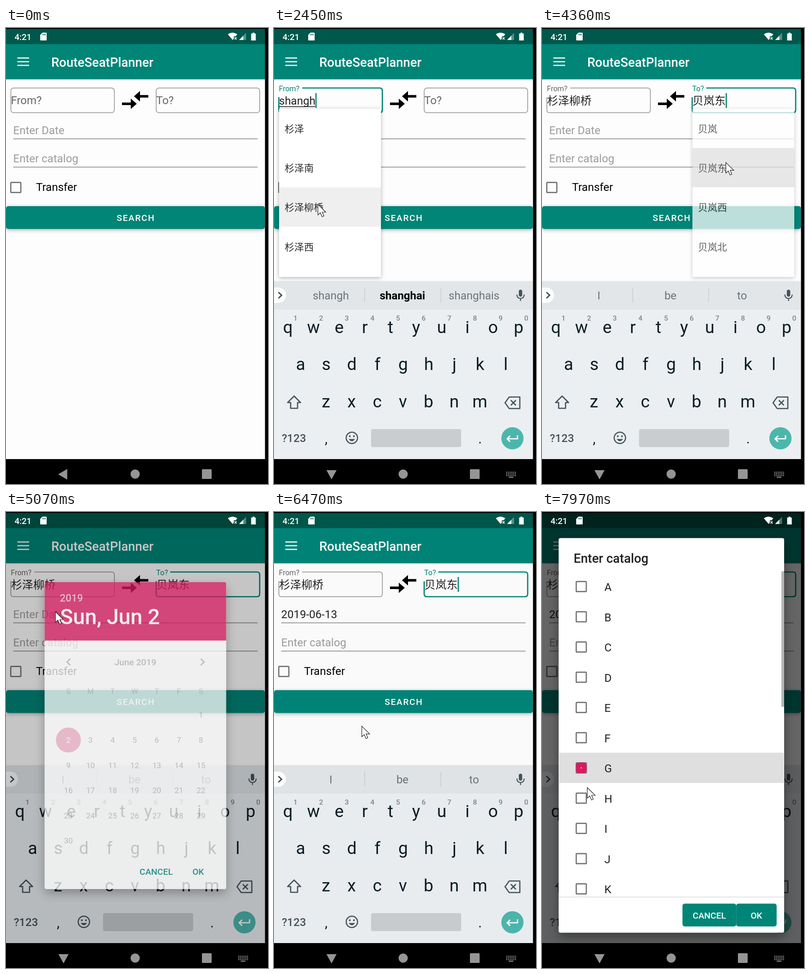
An HTML page that plays this animation: 567 by 988 pixels, repeating every 7990 ms.

```html
<!DOCTYPE html>
<html lang="en">
<head>
<meta charset="utf-8">
<title>Booking form</title>
<style>
html, body { margin: 0; width: 100%; height: 100%; overflow: hidden; background: #000; }
svg { display: block; width: 567px; height: 988px; }
text { font-family: Roboto, "Noto Sans CJK SC", "Noto Sans CJK", sans-serif; white-space: pre; }
.med { font-weight: 500; }
.mid { text-anchor: middle; }
.lift { filter: drop-shadow(0 2px 4px rgba(0,0,0,.3)); }
.modal { filter: drop-shadow(0 9px 11px rgba(0,0,0,.38)); }
</style>
</head>
<body>
<svg id="stage" viewBox="0 0 567 988"></svg>
<script>
const LOOP = 7990, TEAL = '#008577', PINK = '#d81b60', INK = '#212121';
const stage = document.getElementById('stage');
const $ = id => document.getElementById(id);

// ---------- markup helpers ----------
const text = (x, y, size, fill, str, extra = '') =>
  `<text x="${x}" y="${y}" font-size="${size}" fill="${fill}" ${extra}>${str}</text>`;
const rect = (x, y, w, h, fill, extra = '') =>
  `<rect x="${x}" y="${y}" width="${w}" height="${h}" fill="${fill}" ${extra}/>`;
const path = (d, extra) => `<path d="${d}" ${extra}/>`;
const stroke = (color, w) => `fill="none" stroke="${color}" stroke-width="${w}"`;
const box = (cx, cy, extra = '') =>
  `<rect x="${cx - 10.9}" y="${cy - 10.9}" width="21.8" height="21.8" rx="1.5" ${stroke('#757575', 2.7)} ${extra}/>`;

function statusIcons() {
  return text(18.5, 26, 18.6, '#fff', '4:21', 'class="med"') +
    path('M79 10H86.5Q88 10 88 11.5V25.5Q88 27 86.5 27H75.5Q74 27 74 25.5V15Z', 'fill="#fff"') +
    path('M79.5 12.5V16M82.3 12.5V16M85 12.5V16', stroke('#00574b', 1.3)) +
    path('M480 13.5Q490 6.5 500.5 13.5L497 18H493V23L490.5 26Z', 'fill="#fff"') +
    path('M494.5 20L499 25M499 20L494.5 25', stroke('#fff', 1.6)) +
    path('M504.5 26L519.5 10.5V26Z', 'fill="#fff" opacity=".35"') +
    path('M504.5 26L513.5 16.7V26Z', 'fill="#fff"') +
    path('M530.5 12H533.5V10H537.5V12H540.5V27H530.5Z', 'fill="#fff"');
}

function field(id, x, label) {
  return `<g id="${id}">
    <rect class="whole" x="${x}" y="130" width="224" height="53.5" rx="6" ${stroke('#8f8f8f', 1.5)}/>
    <path class="notch" fill="none"/>
    ${text(x, 165, 24, '#666', label, 'class="label"')}
    ${text(x + .5, 166, 24, INK, '', 'class="value"')}
    ${rect(x, 169.5, 0, 1.6, INK, 'class="under"')}
    ${rect(0, 141, 2.6, 32, TEAL, 'class="caret"')}
  </g>`;
}

function dropdown(id, x) {
  const rows = [0, 1, 2, 3].map(i => text(x + 12, 226 + i * 85.2, 21, '#2a2a2a', '', 'class="row"'));
  return `<g id="${id}" class="lift" opacity="0">${rect(x, 175, 220.5, 364.5, '#fff', 'rx="2"')}
    ${rect(x, 175, 220.5, 85, '#000', 'class="press" opacity="0"')}
    ${rect(x + 214, 175, 6, 11, '#777', 'class="thumb"')}${rows.join('')}</g>`;
}

function keyboard() {
  const key = '#0b1c24', icon = '#45535b', step = 55.5;
  const row = (str, x0, y) => [...str].map((c, i) => text(x0 + i * step, y, 37, key, c, 'class="mid"')).join('');
  const nums = [...'1234567890'].map((c, i) =>
    text(46.5 + i * step, 634, 15.5, '#7d868b', c, 'class="mid med"')).join('');
  return `<g id="keyboard">` +
    rect(0, 547.5, 561, 2, '#f0f1f2') + rect(0, 549, 561, 386, '#ebeff2') + rect(0, 549, 561, 61, '#e2e6e9') +
    path('M0 562.5H9.5A16.5 16.5 0 0 1 9.5 595.5H0Z', 'fill="#fff"') +
    path('M9.5 572.5L16.5 579L9.5 585.5', stroke('#37464e', 2.6)) +
    rect(195.7, 563, 1.2, 32, '#c3c8cb') + rect(360.3, 563, 1.2, 32, '#c3c8cb') +
    [123, 278, 433].map((x, i) => text(x, 588, 24, '#6b7377', '', `class="mid" id="hint${i}"`)).join('') +
    rect(529.8, 567, 7.4, 15, icon, 'rx="3.7"') +
    path('M525.5 577.5Q526 586 533.5 586Q541 586 541.5 577.5M533.5 586V591.5', stroke(icon, 2.2)) +
    row('qwertyuiop', 30, 661) + nums + row('asdfghjkl', 57.5, 741) + row('zxcvbnm', 112.5, 822) +
    path('M43.5 797.5L57.5 811.5H51V824H36V811.5H29.5Z', stroke(icon, 2.6) + ' stroke-linejoin="round"') +
    path('M509 799.5H532V824.5H509L500 812Z', stroke(icon, 2.6) + ' stroke-linejoin="round"') +
    path('M512.5 806.5L523.5 817.5M523.5 806.5L512.5 817.5', stroke(icon, 2.6)) +
    text(43, 897, 24, icon, '?123', 'class="mid med"') +
    text(113, 900, 30, key, ',', 'class="mid"') + text(446, 900, 30, key, '.', 'class="mid"') +
    `<circle cx="168.5" cy="888" r="12.3" ${stroke(icon, 2.5)}/>
     <circle cx="164" cy="884.5" r="2" fill="${icon}"/><circle cx="173" cy="884.5" r="2" fill="${icon}"/>` +
    path('M161.5 890.5Q168.5 900 175.5 890.5Z', `fill="${icon}"`) +
    rect(210, 869, 195, 39, '#c9cdd0', 'rx="4"') +
    `<circle cx="516" cy="889" r="24" fill="#4db6ac"/>` +
    path('M527 882.5V890H505M511 883.5L504.5 890L511 896.5', stroke('#fff', 2.7)) + `</g>`;
}

function navBar() {
  let dots = '';
  for (let r = 0; r < 3; r++)
    for (let c = 0; c < 6; c++) dots += rect(502.5 + c * 3.8, 961.5 + r * 3.6, 2.2, 2.2, '#959595');
  return rect(0, 934, 567, 54, '#000') + rect(560.5, 0, 7, 988, '#000') +
    path('M113 967L132.5 955.5V978.5Z', 'id="back" fill="#959595"') +
    `<circle cx="279.5" cy="966.5" r="10" fill="#959595"/>` + rect(424, 956, 21, 21, '#959595', 'rx="1.5"') +
    `<g id="imeOn">${path('M113.5 958H135.5L124.5 978Z', 'fill="#959595"')}${dots}
      ${rect(508, 972.3, 10, 2, '#959595')}</g>`;
}

const dayX = c => 135 + c * 47.83, dayY = r => 439.5 + r * 54.55;

function dateDialog() {
  let days = '';
  for (let d = 1; d <= 30; d++) {
    const n = d + 5;
    days += text(dayX(n % 7), dayY(n / 7 | 0) + 6, 16.8, INK, d, `class="mid" id="day${d}"`);
  }
  const heads = [...'SMTWTFS'].map((c, i) => text(dayX(i), 393.5, 16.4, '#757575', c, 'class="mid"')).join('');
  return `<g id="dateBox" class="modal" opacity="0">` + rect(83.5, 152, 393, 665, '#fff', 'rx="4"') +
    path('M83.5 278.5V156Q83.5 152 87.5 152H472.5Q476.5 152 476.5 156V278.5Z', `fill="${PINK}"`) +
    text(116.5, 194, 22, '#fff', '2019', 'class="med" opacity=".7"') +
    text(117, 242.5, 46.3, '#fff', '', 'class="med" id="picked"') +
    `<g id="month">` + path('M139 318L132 325L139 332M421.5 318L428.5 325L421.5 332', stroke('#222', 2.7)) +
    text(280, 331.5, 19.2, INK, 'June 2019', 'class="mid med"') + heads +
    `<circle id="spot" r="27" fill="${PINK}"/>` + days + `</g>` +
    text(289, 785.5, 19, TEAL, 'CANCEL', 'class="med"') + text(403.5, 785.5, 19, TEAL, 'OK', 'class="med"') + `</g>`;
}

function listDialog() {
  const items = [...'ABCDEFGHIJK'].map((c, i) => {
    const y = 161.5 + i * 65.5;
    return box(85, y) + text(135, y + 9.5, 24, INK, c);
  }).join('');
  return `<g id="listBox" class="modal" opacity="0">` + rect(36, 56.5, 488, 855, '#fff', 'rx="4"') +
    text(68.5, 110, 27.3, INK, 'Enter catalog', 'class="med"') +
    rect(37, 521.5, 486, 65.5, '#dfdfdf', 'id="rowG" opacity="0"') + items +
    `<rect id="tick" fill="none" stroke="${PINK}"/>` +
    rect(518, 128.5, 6, 293.5, '#b3b8b5') + rect(36, 833.5, 488, 1.3, '#d5d5d5') +
    rect(304, 848.5, 116.5, 49.5, TEAL, 'rx="5"') + rect(420.3, 848.5, 87.5, 49.5, TEAL, 'rx="5"') +
    text(362, 880.5, 19, '#fff', 'CANCEL', 'class="mid med"') +
    text(464, 880.5, 19, '#fff', 'OK', 'class="mid med"') + `</g>`;
}

stage.innerHTML =
  rect(0, 0, 567, 988, '#000') + rect(0, 2, 561, 932, '#fdfdfd') +
  rect(0, 111, 561, 2, '#e4e4e4') + rect(0, 2, 561, 33, '#00574b') + rect(0, 35, 561, 76, TEAL) +
  path('M24.5 65H50M24.5 73H50M24.5 81H50', stroke('#fff', 2.7)) +
  text(98, 83.5, 27.4, '#fff', 'RouteSeatPlanner', 'class="med"') +
  path('M251 161.5H270V153L283 164.3L270 175.5V167H251ZM308 145.3H290V136.5L277 148L290 159.3V150.8H308Z', 'fill="#000"') +
  field('from', 10.5, 'From?') + field('to', 325, 'To?') +
  text(15.5, 230, 24, '#9c9c9c', '', 'id="date"') + rect(15.5, 239.5, 529, 1.4, '#7c7c7c', 'id="dateLine"') +
  text(15.5, 291, 24, '#9c9c9c', 'Enter catalog') + rect(15.5, 300.7, 529, 1.4, '#7c7c7c') +
  box(21.2, 345.5) + text(65, 352.5, 24, '#000', 'Transfer') +
  `<g class="lift">${rect(0, 386, 560.5, 49.5, TEAL, 'rx="5"')}</g>` +
  text(239.5, 418, 19, '#fff', 'SEARCH', 'class="med" letter-spacing="1.7"') +
  keyboard() + dropdown('fromList', 11) + dropdown('toList', 325.5) +
  rect(0, 2, 561, 932, '#000', 'id="dim"') + statusIcons() + navBar() +
  dateDialog() + listDialog() +
  path('M0 0V23L5.3 18.3L9.2 27L13 25.3L9.3 17H17Z', 'id="pointer" fill="#fff" stroke="#222" stroke-width="1.2"');

// ---------- timing ----------
const ramp = (t, a, b) => Math.min(1, Math.max(0, (t - a) / (b - a)));
const ease = p => p * p * (3 - 2 * p);
const pulse = (t, a, b, c, d) => ramp(t, a, b) - ramp(t, c, d);
const within = (t, a, b) => t >= a && t < b;
const at = (steps, t) => steps.reduce((v, s) => t >= s[0] ? s : v);
const set = (el, attrs) => { for (const k in attrs) el.setAttribute(k, attrs[k]); };
const say = (el, str) => { if (el.textContent !== str) el.textContent = str; };

const pointerPath = [
  [20, 200, 420], [420, 173, 153], [2160, 173, 153], [2400, 95, 382], [2590, 95, 382], [2800, 340, 110],
  [2920, 397, 148], [4060, 397, 148], [4200, 400, 292], [4350, 400, 292], [4570, 107, 216], [5510, 107, 216],
  [5610, 314, 550], [5860, 314, 550], [6090, 410, 770], [6300, 410, 770], [6470, 190, 464], [6570, 100, 288],
  [7390, 100, 288], [7600, 100, 545], [7790, 100, 545], [7930, 98, 597]
];
const fromTyping = [[0, ''], [1210, 's'], [1270, 'sh'], [1350, 'sha'], [1500, 'shan'], [1600, 'shang'],
  [1700, 'shangh'], [2480, '杉泽柳桥']];
const toTyping = [[0, ''], [3250, 'b'], [3320, 'be'], [3470, 'bei'], [3600, 'beij'], [4300, '贝岚东']];
const idle = ['I', 'be', 'to'];
const hints = [[0, 'I', 'the', 'to'], [1210, 's', 'so', 'she'], [1270, 'sh', 'she', 'show'],
  [1350, 'sha', 'shanghai', 'shang'], [1500, 'shan', 'shanghai', 'shang'],
  [1700, 'shangh', 'shanghai', 'shanghais'], [2480, ...idle], [3250, 'b', 'be', 'but'],
  [3320, 'bei', 'beij', 'beijing'], [3600, 'beij', 'beijing', 'being'], [4300, ...idle]];
const lists = {
  wide: ['松杉屯', '杉泽南', '银杉卫', '银杉园区'],
  near: ['杉泽', '杉泽南', '杉泽柳桥', '杉泽西'],
  goal: ['贝岚', '贝岚东', '贝岚西', '贝岚北']
};

function pointerAt(t) {
  const i = pointerPath.findIndex(k => k[0] > t);
  if (i < 0) return pointerPath[pointerPath.length - 1].slice(1);
  if (i === 0) return pointerPath[0].slice(1);
  const [a, ax, ay] = pointerPath[i - 1], [b, bx, by] = pointerPath[i];
  const p = ease(ramp(t, a, b));
  return [ax + (bx - ax) * p, ay + (by - ay) * p];
}

function drawField(id, x, gap, rise, focus, value, caretOn) {
  const part = c => $(id).querySelector('.' + c);
  const r = x + 224, color = focus ? TEAL : '#8f8f8f', lifted = rise > .3;
  set(part('whole'), { opacity: lifted ? 0 : 1, stroke: color, 'stroke-width': focus ? 2.7 : 1.5 });
  set(part('notch'), {
    opacity: lifted ? 1 : 0, stroke: color, 'stroke-width': focus ? 2.7 : 1.5,
    d: `M${x + gap} 130H${r - 6}Q${r} 130 ${r} 136V177.5Q${r} 183.5 ${r - 6} 183.5H${x + 6}Q${x} 183.5 ${x} 177.5V150`
  });
  set(part('label'), { y: 165 - 28 * rise, 'font-size': 24 - 8 * rise, fill: focus ? TEAL : '#666' });
  say(part('value'), value);
  const w = value ? part('value').getComputedTextLength() : 0;
  set(part('under'), { width: /^[a-z]/.test(value) ? w : 0 });
  set(part('caret'), { x: x + .5 + w, opacity: focus && caretOn ? 1 : 0 });
}

function drawList(id, alpha, names, row, press, thumb) {
  const g = $(id);
  set(g, { opacity: alpha });
  g.querySelectorAll('.row').forEach((el, i) => say(el, names[i]));
  set(g.querySelector('.press'), { y: 175 + row * 85.2, opacity: press });
  set(g.querySelector('.thumb'), { opacity: thumb });
}

function render(t) {
  const onTo = t >= 3060;
  drawField('from', 10.5, 50.5, ease(ramp(t, 560, 710)), t >= 560 && !onTo, at(fromTyping, t)[1], t >= 700);
  drawField('to', 325, 30.5, ease(ramp(t, 3060, 3210)), onTo, at(toTyping, t)[1], !within(t, 4710, 5150));
  drawList('fromList', pulse(t, 1300, 1420, 2520, 2640), t < 1500 ? lists.wide : lists.near, 2,
    .12 * ramp(t, 2420, 2480), t < 1500 ? .6 : 0);
  drawList('toList', pulse(t, 3390, 3510, 4330, 4450), lists.goal, 1, .12 * ramp(t, 4230, 4300), 0);

  const slide = 1 - ramp(t, 820, 970);
  set($('keyboard'), { transform: `translate(0 ${390 * slide * slide})`, opacity: t < 820 ? 0 : 1 });
  const words = at(hints, t), typing = within(t, 1210, 2480) || within(t, 3250, 4300);
  for (let i = 0; i < 3; i++) say($('hint' + i), words[i + 1]);
  set($('hint1'), { fill: typing ? '#000' : '#6b7377', 'font-weight': typing ? 700 : 400 });
  set($('back'), { opacity: t < 770 ? 1 : 0 });
  set($('imeOn'), { opacity: t < 770 ? 0 : 1 });

  const dated = t >= 6290;
  say($('date'), dated ? '2019-06-13' : 'Enter Date');
  set($('date'), { fill: dated ? INK : '#9c9c9c' });
  set($('dateLine'), { height: within(t, 4710, 4730) ? 2.6 : 1.4 });

  const dateDim = ramp(t, 4950, 5170) ** 1.65 - ramp(t, 6290, 6475);
  const listDim = ramp(t, 6800, 7020) ** 1.65;
  set($('dim'), { opacity: .6 * Math.max(dateDim, listDim, 0) });

  const chosen = t >= 5800;
  set($('dateBox'), { opacity: pulse(t, 4950, 5112, 6290, 6440) });
  set($('month'), { opacity: ramp(t, 5035, 5150) });
  say($('picked'), chosen ? 'Thu, Jun 13' : 'Sun, Jun 2');
  set($('spot'), { cx: dayX(chosen ? 4 : 0), cy: dayY(chosen ? 2 : 1) });
  set($('day2'), { fill: chosen ? PINK : '#fff' });
  set($('day13'), { fill: chosen ? '#fff' : INK });

  set($('listBox'), { opacity: ramp(t, 6800, 6960) });
  set($('rowG'), { opacity: ramp(t, 7690, 7830) });
  // The pink frame thickens inward until the box is full.
  const fill = ramp(t, 7870, 7970), w = 2.7 + 7.6 * fill, side = 23 - w;
  set($('tick'), { x: 85 - side / 2, y: 554.3 - side / 2, width: side, height: side, rx: 1,
    'stroke-width': w, opacity: t < 7870 ? 0 : 1 });

  const [px, py] = pointerAt(t);
  set($('pointer'), { transform: `translate(${px} ${py})`, opacity: t < 20 ? 0 : 1 });
}

const start = performance.now();
function tick() {
  render((performance.now() - start) % LOOP);
  requestAnimationFrame(tick);
}
tick();
</script>
</body>
</html>
```
